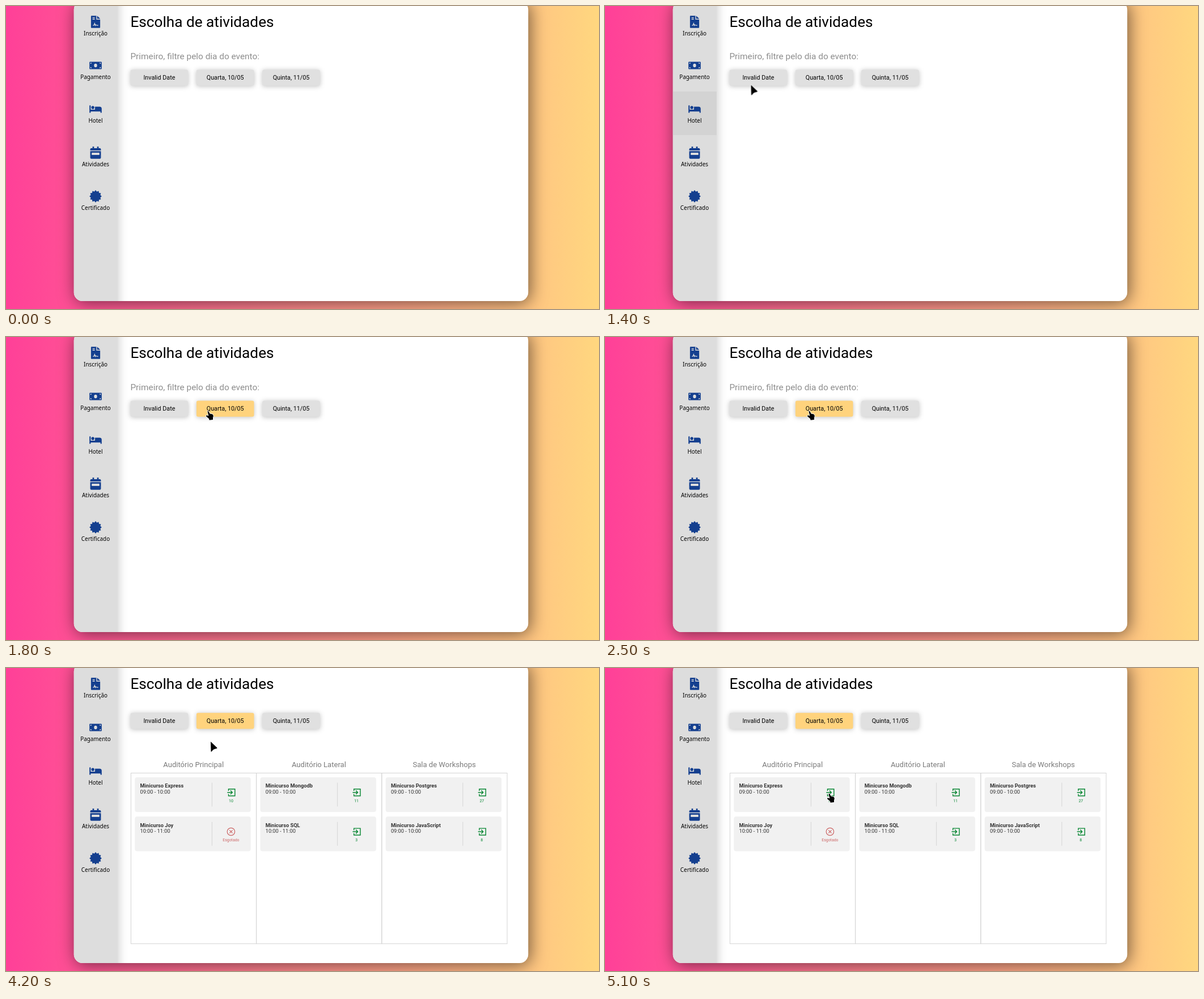
An HTML page that plays this animation: 1046x535 px, repeating every 8000 ms.

```html
<!DOCTYPE html>
<html lang="pt-BR">
<head>
<meta charset="utf-8">
<title>Escolha de atividades</title>
<style>
  html, body { margin: 0; width: 100%; height: 100%; overflow: hidden; }
  svg#stage { display: block; width: 1046px; height: 535px; background: linear-gradient(to right, #ff4098, #ffd77f); }
  text { font-family: Roboto, sans-serif; }
  .mid { text-anchor: middle; }
  .panel { fill: #fff; filter: drop-shadow(3px 3px 15px rgba(0, 0, 0, .55)); }
  .side { fill: #ddd; filter: drop-shadow(2px 0 8px rgba(0, 0, 0, .2)); }
  .icon { fill: #143f8f; fill-rule: evenodd; }
  .label { font: 9.9px Ubuntu, "Noto Sans", sans-serif; text-anchor: middle; }
  .title { font-size: 26.2px; }
  .hint { font-size: 15.4px; fill: #8e8e8e; }
  .btn rect { fill: #e0e0e0; filter: drop-shadow(0 1.5px 4px rgba(0, 0, 0, .25)); }
  .btn text { font-size: 10.78px; text-anchor: middle; }
  .room { font-size: 13.09px; fill: #7b7b7b; text-anchor: middle; }
  .line { fill: none; stroke: #d4d4d4; }
  .card { fill: #f1f1f1; }
  .name { font-size: 9.24px; font-weight: 700; fill: #343434; }
  .time { font-size: 9.24px; fill: #343434; }
  .seat { font-size: 6.93px; text-anchor: middle; stroke: none; }
  .mark { fill: none; stroke-width: 1.4; }
  .cursor path { stroke: #fff; stroke-width: 1.6; stroke-linejoin: round; paint-order: stroke; }

  .step { animation: 8s step-end infinite; }
  #item2 { animation-name: item; }
  #btn0 rect { animation: first 8s step-end infinite; }
  #btn1 rect { animation: second 8s step-end infinite; }
  #days { animation-name: lift; }
  #hint { animation-name: before; }
  #board { animation-name: after; }
  #cursor { animation-name: move; }
  #arrow { animation-name: arrow; }
  #hand { animation-name: hand; }

  @keyframes item { 0%, 18.75% { fill: transparent } 15% { fill: #d3d3d3 } }
  @keyframes first { 0%, 22.5% { fill: #e0e0e0 } 18.75% { fill: #ffd37d } }
  @keyframes second { 0% { fill: #e0e0e0 } 22.5%, 100% { fill: #ffd37d } }
  @keyframes lift { 0% { transform: none } 37.5%, 100% { transform: translateY(-33.2px) } }
  @keyframes before { 0% { visibility: visible } 37.5%, 100% { visibility: hidden } }
  @keyframes after { 0% { visibility: hidden } 37.5%, 100% { visibility: visible } }
  @keyframes arrow {
    0%, 18.75%, 61.25%, 100% { visibility: hidden }
    10%, 37.5% { visibility: visible }
  }
  @keyframes hand {
    0%, 37.5% { visibility: hidden }
    18.75%, 61.25%, 100% { visibility: visible }
  }
  @keyframes move {
    0%, 10% { transform: translate(795px, 522px) }
    11.25% { transform: translate(640px, 440px) }
    12.5% { transform: translate(450px, 340px) }
    13.75% { transform: translate(285px, 255px) }
    15% { transform: translate(185px, 200px) }
    16.25% { transform: translate(178px, 180px) }
    17.5% { transform: translate(257.5px, 139.5px) }
    18.75% { transform: translate(261px, 134px) }
    20% { transform: translate(268px, 131px) }
    21.25% { transform: translate(304px, 130px) }
    22.5% { transform: translate(354px, 130px) }
    23.75% { transform: translate(355px, 130px) }
    25% { transform: translate(355.5px, 130px) }
    26.25% { transform: translate(356px, 130px) }
    31.25% { transform: translate(358px, 130px) }
    37.5% { transform: translate(361px, 129px) }
    52.5% { transform: translate(361px, 130px) }
    53.75% { transform: translate(361px, 132px) }
    56.25% { transform: translate(368px, 148px) }
    57.5% { transform: translate(382px, 174px) }
    58.75% { transform: translate(394px, 197px) }
    61.25% { transform: translate(393px, 220px) }
    63.75%, 100% { transform: translate(393px, 221px) }
  }
</style>
</head>
<body>
<svg id="stage" viewBox="0 0 1046 535">
  <defs>
    <clipPath id="round"><rect x="119.7" y="-9" width="801.5" height="530" rx="15.4"/></clipPath>
    <g id="enter" stroke="#078632" class="mark">
      <path d="M-4.4-2.6V-5.9H6.9V6H-4.4V2.7M-6.6 0H2.2M-1-3.4L2.4 0L-1 3.4"/>
    </g>
    <g id="full" stroke="#cc6666" class="mark">
      <circle r="6.7" stroke-width="1.2"/>
      <path d="M-2.6-2.6L2.6 2.6M2.6-2.6L-2.6 2.6" stroke-width="1.3"/>
    </g>
  </defs>

  <rect class="panel" x="119.7" y="-9" width="801.5" height="530" rx="15.4"/>
  <g clip-path="url(#round)">
    <rect class="side" x="119.7" y="-20" width="77" height="560"/>
    <g id="menu"></g>
  </g>

  <text class="title" x="219.4" y="37">Escolha de atividades</text>
  <text class="hint step" id="hint" x="219.4" y="94">Primeiro, filtre pelo dia do evento:</text>
  <g id="days" class="step"></g>
  <g id="board" class="step"></g>

  <g id="cursor" class="cursor step">
    <path id="arrow" class="step" d="M0 0L.5 17.6Q1.6 18 2.6 16.4Q5 13 11 12Q12 11.4 11 10.4Z"/>
    <path id="hand" class="step" d="M1.4 1.2Q2.7 .2 3.7 1.8L5.6 5.4L9.8 6.2Q11.6 7 11.8 9.4L11 12.6V16L4.6 16.7L4 14.2L-.8 10.2Q-1.6 8.4 .2 8.2L3.4 9.2Z"/>
  </g>
</svg>

<script>
  const put = (id, markup) => document.getElementById(id).innerHTML = markup;

  // Twelve-pointed seal
  const seal = 'M' + Array.from({ length: 24 }, (_, i) => {
    const r = i % 2 ? 205 : 258, a = i * Math.PI / 12;
    return `${256 + r * Math.sin(a)} ${256 - r * Math.cos(a)}`;
  }).join('L') + 'Z';

  const menu = [
    ['Inscrição', 384, 'M224 0V160H384V488Q384 512 360 512H24Q0 512 0 488V24Q0 0 24 0ZM64 64V96H160V64ZM64 128V160H160V128ZM256 0L384 122V128H256Z'],
    ['Pagamento', 640, 'M32 64H608Q640 64 640 96V416Q640 448 608 448H32Q0 448 0 416V96Q0 64 32 64ZM48 400H112A64 64 0 0 0 48 336ZM48 176A64 64 0 0 0 112 112H48ZM592 400V336A64 64 0 0 0 528 400ZM592 176V112H528A64 64 0 0 0 592 176ZM240 256a80 96 0 1 0 160 0a80 96 0 1 0-160 0Z'],
    ['Hotel', 640, 'M96 176a80 80 0 1 0 160 0a80 80 0 1 0-160 0ZM0 64H64V288H288V128H528Q640 128 640 240V448H576V384H64V448H0Z'],
    ['Atividades', 448, 'M0 192H448V464Q448 512 400 512H48Q0 512 0 464ZM64 256V352H384V256ZM0 160V112Q0 64 48 64H96V0H160V64H288V0H352V64H400Q448 64 448 112V160Z'],
    ['Certificado', 512, seal]
  ];
  const scrawl = '<path d="M80 400H104Q126 400 134 380L152 324L179 402Q200 360 216 388Q226 400 256 400H304" fill="none" stroke="#ddd" stroke-width="32"/>';
  put('menu', menu.map(([label, w, d], i) => {
    const y = 28 + 77 * i, k = 21.6 / Math.max(w, 512);
    return `<rect id="item${i}" class="step" x="119.7" y="${y - 31}" width="77" height="77" fill="transparent"/>
      <g transform="translate(158 ${y}) scale(${k}) translate(${-w / 2} -256)"><path class="icon" d="${d}"/>${i ? '' : scrawl}</g>
      <text class="label" x="158" y="${y + 23.6}">${label}</text>`;
  }).join(''));

  put('days', ['Invalid Date', 'Quarta, 10/05', 'Quinta, 11/05'].map((day, i) => {
    const x = 219.6 + 116.3 * i;
    return `<g id="btn${i}" class="btn"><rect x="${x}" y="112.4" width="101.6" height="28.4" rx="3"/>
      <text x="${x + 50.8}" y="130.3">${day}</text></g>`;
  }).join(''));

  const rooms = [
    ['Auditório Principal', ['Express', '09:00 - 10:00', 10], ['Joy', '10:00 - 11:00', 0]],
    ['Auditório Lateral', ['Mongodb', '09:00 - 10:00', 11], ['SQL', '10:00 - 11:00', 3]],
    ['Sala de Workshops', ['Postgres', '09:00 - 10:00', 27], ['JavaScript', '09:00 - 10:00', 8]]
  ];
  const card = ([name, time, seats], row) => `<g transform="translate(0 ${69.3 * row})">
    <rect class="card" x="7.4" y="193" width="204.4" height="61.3" rx="4"/>
    <text class="name" x="16.6" y="211.3">Minicurso ${name}</text>
    <text class="time" x="16.6" y="222.2">${time}</text>
    <path class="line" d="M143.5 202.5V244.5"/>
    <use href="#${seats ? 'enter' : 'full'}" x="177" y="219.7"/>
    <text class="seat" x="177" y="236.6" fill="${seats ? '#078632' : '#cc6666'}">${seats || 'Esgotado'}</text>
  </g>`;
  put('board', rooms.map(([room, ...cards], i) => `<g transform="translate(${219.9 + 221.2 * i} 0)">
    <text class="room" x="110.8" y="174.6">${room}</text>
    <rect class="line" x=".5" y="185.5" width="221.2" height="301.3"/>
    ${cards.map(card).join('')}
  </g>`).join(''));
</script>
</body>
</html>
```
